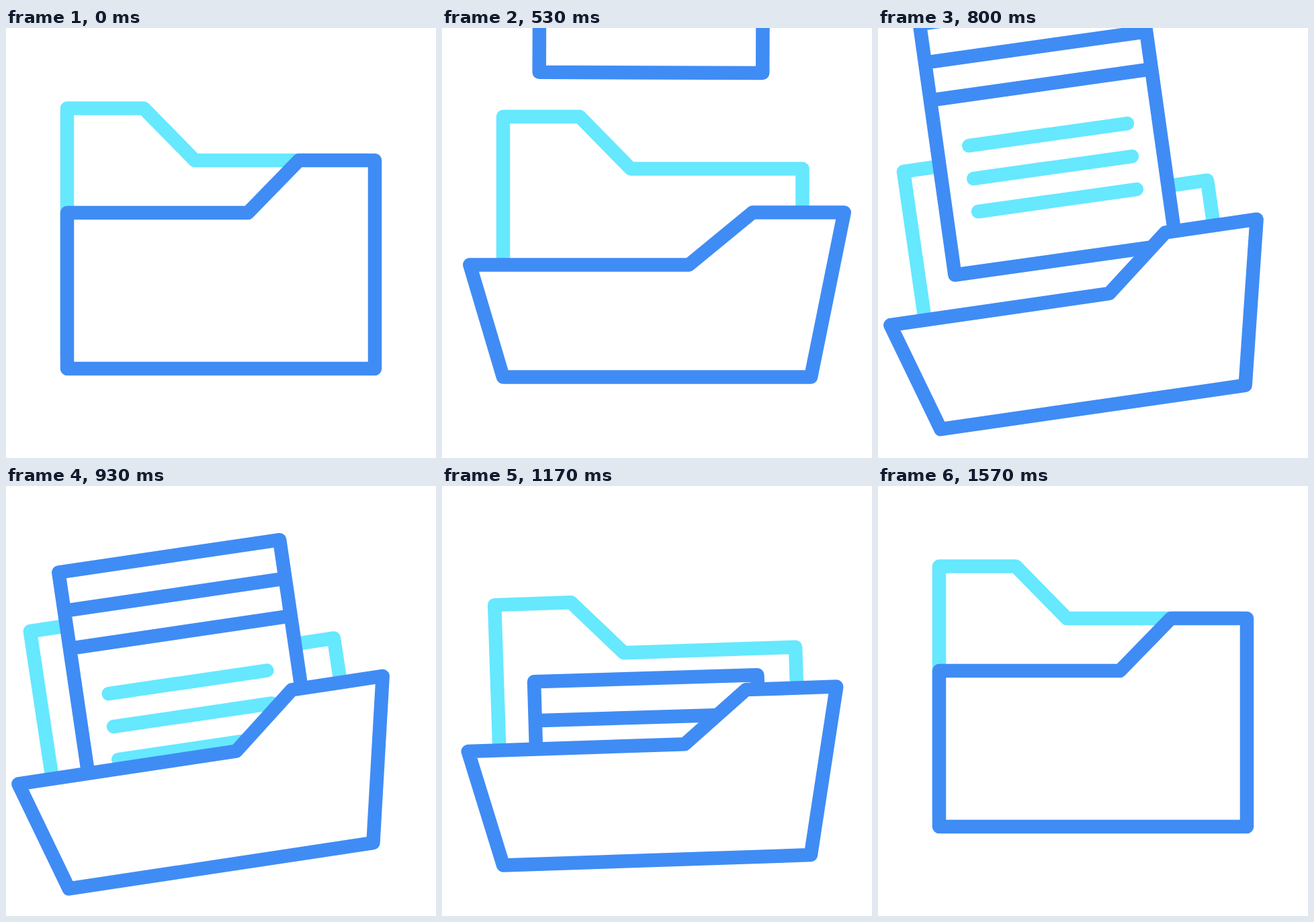
An HTML page for the animation above (2 s loop, 640 px wide and 640 px high).

```html
<!DOCTYPE html>
<html lang="en">
<head>
<meta charset="utf-8">
<title>Folder</title>
<style>
  html, body { margin: 0; height: 100%; overflow: hidden; background: #fff; }
  svg { display: block; width: 100vw; height: 100vh; }
  path { fill: #fff; stroke: #408cf5; stroke-width: 20.5; stroke-linecap: round; stroke-linejoin: round; }
  .light { stroke: #66e8ff; }
</style>
</head>
<body>
<svg viewBox="0 0 640 640">
  <clipPath id="pocket"><path d="M0-400H640V507H0Z"/></clipPath>
  <g id="folder">
    <path class="light" d="M91 490V119.5H205L281 197H536.5V490"/>
    <g clip-path="url(#pocket)">
      <g id="paper">
        <path d="M146 0H478.5V377H146ZM146 58H478.5M146 114.5H478.5"/>
        <path class="light" d="M193.5 189.5H431.5M193.5 239H431.5M193.5 288.5H431.5"/>
      </g>
    </g>
    <path id="front"/>
  </g>
</svg>
<script>
  const LOOP = 2000, FPS = 30;
  const [folder, paper, front] = ['folder', 'paper', 'front'].map(id => document.getElementById(id));

  const progress = (f, from, to) => Math.min(1, Math.max(0, (f - from) / (to - from)));
  const ease = x => (1 - Math.cos(Math.PI * x)) / 2;

  // Eased value at f through [time, value] keys
  function track(f, keys) {
    let value = keys[0][1];
    for (let i = 1; i < keys.length; i++) {
      const [t0, v0] = keys[i - 1], [t1, v1] = keys[i];
      value += (v1 - v0) * ease(progress(f, t0, t1));
    }
    return value;
  }

  // Eases open, then sags slowly before snapping shut
  function openness(f) {
    const x = progress(f, 19, 47);
    return ease(progress(f, 0, 18.8)) - 0.26 * x ** 2 - 0.74 * x ** 6;
  }

  function draw(f) {
    const open = openness(f), drop = 68.5 * open, flare = 52.5 * open;
    const dip = track(f, [[12, 0], [25, 58.3], [32, 58.3], [44, 0]]);
    const tilt = track(f, [[16.2, 0], [27, -10], [32, 5], [36, -3.1], [41, 0]]);
    const paperTop = track(f, [[8.5, -407], [42.5, 320]]);

    front.setAttribute('d', `M${91 - flare} ${275 + drop}H${360 + 8 * open}
      L${436 + 28 * open} ${197 + drop}H${549 + flare}L549 507H91Z`);
    paper.setAttribute('transform', `translate(0 ${paperTop}) rotate(.2 312 0)`);
    folder.setAttribute('transform', `translate(0 ${dip}) rotate(${tilt} 320 507)`);
  }

  // Steps at 30 fps; the small lead absorbs times rounded down to 10 ms
  function tick() {
    const time = performance.now() % LOOP / 1000;
    draw(Math.floor(time * FPS + 0.12));
    requestAnimationFrame(tick);
  }
  tick();
</script>
</body>
</html>
```
